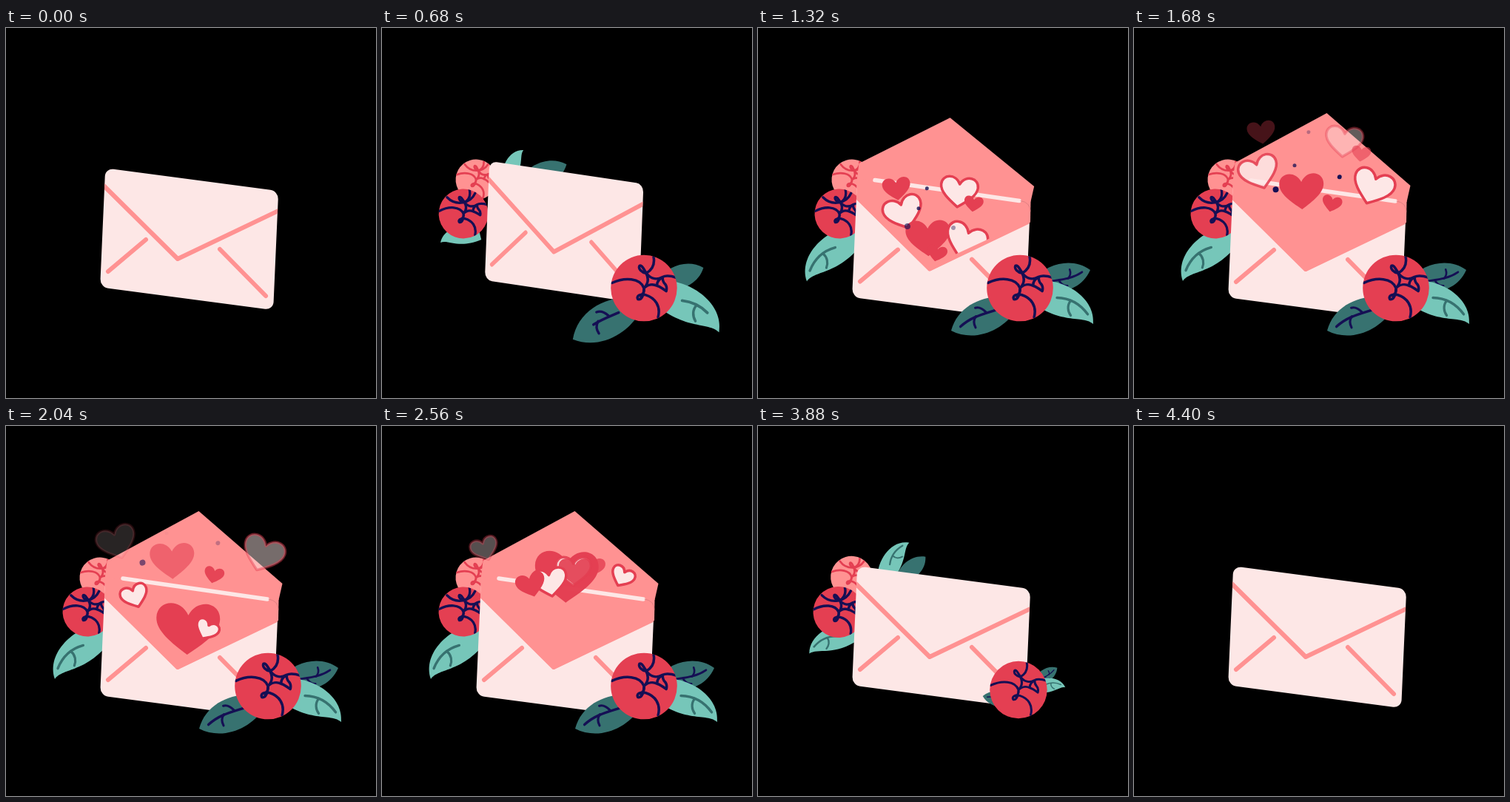
Recreate the animation shown at these times as an HTML page with a canvas. Size 500x500 px, loop 5.08 s.

```html
<!DOCTYPE html>
<html lang="en">
<head>
<meta charset="utf-8">
<title>Love letter</title>
<style>
html, body { margin: 0; width: 100%; height: 100%; overflow: hidden; background: #000; }
canvas { display: block; width: 500px; height: 500px; }
</style>
</head>
<body>
<canvas id="stage" width="500" height="500"></canvas>
<script>
const LOOP = 5080, STEP = 40;
const PALE = '#fde7e6', PINK = '#ff9292', RED = '#e43f52', NAVY = '#150f54',
  TEAL = '#76c6b9', PINE = '#377270';
const ctx = document.getElementById('stage').getContext('2d');
ctx.lineCap = ctx.lineJoin = 'round';

const clamp = x => Math.max(0, Math.min(1, x));

// Grows with an overshoot after begin and shrinks the same way before end
function pop(t, begin, end) {
  const x = clamp(Math.min(t - begin, end - t) / 800) - 1;
  return Math.max(0, 1 + 2.7 * x ** 3 + 1.7 * x ** 2);
}

// Opens with a cubic ease-out and closes as its mirror
const openness = t => 1 - (1 - clamp(Math.min(t - 1060, 3460 - t) / 380)) ** 3;

function layer(draw) {
  ctx.save();
  draw();
  ctx.restore();
}

function fill(path, color) {
  ctx.fillStyle = color;
  ctx.fill(path);
}

function stroke(path, color, width) {
  ctx.strokeStyle = color;
  ctx.lineWidth = width;
  ctx.stroke(path);
}

const poly = pts => new Path2D('M' + pts.join('L') + 'Z');

function circle(r) {
  const path = new Path2D();
  path.arc(0, 0, r, 0, 7);
  return path;
}

// ---- Leaves: unit shapes running from base (0,0) to tip (1,0)
const CURVED = {
  shape: new Path2D('M0 -.12C.25 -.33 .82 -.37 1 0C.8 -.04 .6 .27 0 .17Z'),
  vein: new Path2D('M.36 -.06C.52 -.15 .7 -.15 .86 -.08'),
  twig: new Path2D('M.55 -.12C.54 -.04 .59 .03 .66 .06')
};
const STRAIGHT = {
  shape: new Path2D('M0 -.1C.3 -.3 .75 -.3 1 0C.75 .32 .3 .3 0 .1Z'),
  vein: new Path2D('M.28 .02C.48 .04 .66 .07 .85 0'),
  twig: new Path2D('M.42 .05Q.46 .16 .54 .17M.58 .05Q.66 0 .65 -.1')
};

// The leaf turns by swing degrees while it unfolds from base to tip
function drawLeaf(t, kind, color, vein, flip, [bx, by], [tx, ty], swing, begin, end) {
  const p = pop(t, begin, end);
  if (!p) return;
  const size = Math.hypot(tx - bx, ty - by) * p;
  const grown = clamp((t - begin - 180) / 350);
  layer(() => {
    ctx.translate(bx, by);
    ctx.rotate(Math.atan2(ty - by, tx - bx) + swing * (1 - p) * Math.PI / 180);
    ctx.scale(size, size * flip);
    fill(kind.shape, color);
    if (!vein || !grown) return;
    ctx.setLineDash([grown * .6, 9]);
    stroke(kind.vein, vein, .037);
    if (grown > .6) stroke(kind.twig, vein, .034);
  });
}

function drawBackLeaves(t) {
  drawLeaf(t, STRAIGHT, PINE, null, 1, [190, 208], [249, 184], -75, 380, 4056);
  drawLeaf(t, CURVED, TEAL, PINE, 1, [168, 207], [228, 152], -45, 555, 4056);
  drawLeaf(t, CURVED, TEAL, PINE, -1, [132, 277], [66, 342], 75, 555, 4056);
}

function drawFrontLeaves(t) {
  drawLeaf(t, STRAIGHT, PINE, NAVY, 1, [375, 346], [449, 327], -35, 475, 3972);
  drawLeaf(t, CURVED, TEAL, PINE, 1, [372, 352], [453, 400], -54, 280, 3972);
  drawLeaf(t, STRAIGHT, PINE, NAVY, 1, [345, 373], [261, 409], 63, 280, 3972);
}

// ---- Roses: petal lines for a rose of radius 44.5 around (0,0)
const petals = new Path2D(
  'M13 -42C15 -31 10 -24 3 -20C-3 -21 -8 -26 -6 -30C-3 -32 0 -25 4 -19' +
  'M-43 -7C-26 -15 -5 -14 0 0C1 5 -1 8 -5 10' +
  'M3 -20C7 -12 5 -5 0 0C5 -5 12 -6 18 -3' +
  'M4 -19C10 -12 18 -11 25 -15C31 -18 38 -16 44 -14' +
  'M25 -15C19 -11 17 -7 18 -3C22 -2 26 1 30 4C31 0 30 -4 28 -6C26 -8 25 -11 25 -15' +
  'M0 0C0 9 -3 16 -8 15C-11 11 -5 7 2 9C15 13 23 24 19 39');
const crown = new Path2D('M-28 -31C-13 -14 13 -17 23 -36');
const disc = circle(44.5);

function drawRose(x, y, r, turn, color, line, [ax, ay], s) {
  if (!s) return;
  const small = r < 40;
  layer(() => {
    ctx.translate(ax + (x - ax) * s, ay + (y - ay) * s);
    ctx.rotate(turn);
    ctx.scale(r * s / 44.5, r * s / 44.5);
    fill(disc, color);
    ctx.clip(disc);
    stroke(petals, line, small ? 4.4 : 3.5);
    if (small) stroke(crown, line, 4.4);
  });
}

// ---- Envelope
const body = new Path2D();
const flat = new Path2D();
flat.roundRect(0, 0, 234, 161, 11);
body.addPath(flat, new DOMMatrix([1, .132, -.044, 1, 134.2, 189.3]));
const pocket = new Path2D('M132 213L232 312L370 246');
const inside = poly([[134, 188], [368.5, 220], [368, 249], [232, 315], [133, 218]]);
const seams = new Path2D('M138 329L189 286M289 299L351 362');
const hinge = new Path2D('M158 192L353 220');
const fold = new Path2D('M355 220Q368 222 368 234');

function drawEnvelope(t) {
  const bump = Math.sin(clamp((t - 560) / 240) * Math.PI) ** 2;
  const sx = 1 - .11 * bump, open = openness(t);
  layer(() => {
    ctx.translate(234 * (1 - sx), 14 * open - 9.5 * bump);
    ctx.scale(sx, 1);
    fill(body, PALE);
    stroke(seams, PINK, 6);
    layer(() => {
      ctx.clip(body);
      stroke(pocket, PINK, 6);
    });
    if (open) drawFlap(1 - 2 * open);
  });
}

// k runs from 1 (folded down) to -1 (standing up)
function drawFlap(k) {
  const left = [134.5 - 2 * k, 189 + 21 * k], right = [368.5 - 5 * k, 220 + 21 * k];
  const apex = [246 - 14.5 * k, 206.5 + 105.5 * k];
  fill(inside, PINK);
  fill(poly([[134, 190], left, apex, right, [368.5, 221]]), k > 0 ? PALE : PINK);
  if (k > 0) {
    stroke(new Path2D('M' + [left, apex, right].join('L')), PINK, 6);
  } else {
    stroke(hinge, PALE, 5.5);
    stroke(fold, '#d87c7e', .8);
  }
}

// ---- Hearts and dots fanning out of the pocket, slowing as they rise
const heart = new Path2D('M0 .42C-.25 .24 -.5 .06 -.5 -.15C-.5 -.42 -.14 -.48 0 -.2' +
  'C.14 -.48 .5 -.42 .5 -.15C.5 .06 .25 .24 0 .42Z');
const dot = circle(.5);
const mouth = poly([[0, 0], [500, 0], [500, 200], [368, 259], [232, 322], [133, 224], [0, 92]]);

// kind, birth, x at the bottom, sideways drift per rise, speed, size
const floats = [
  ['red', 1120, 210, -.2, 8, 38],
  ['pale', 1100, 252, .18, 7.35, 50],
  ['red', 1140, 270, .23, 6.9, 26],
  ['pale', 1118, 238, -.51, 5.7, 53],
  ['red', 1240, 232, -.05, 5.25, 60],
  ['red', 1290, 232, .38, 4.7, 27],
  ['pale', 1264, 256, .58, 5.65, 56],
  ['dot', 1120, 217, .1, 8, 5],
  ['dot', 1120, 217, 0, 6.1, 5],
  ['dot', 1160, 215, -.21, 4.9, 8],
  ['dot', 1220, 252, .2, 6, 6],
  ['pale', 1730, 229, -.55, 5.7, 37],
  ['red', 1910, 243, .05, 5, 86],
  ['pale', 1920, 230, .75, 5, 32]
];
let seed = 7;
const random = () => (seed = seed * 16807 % 2147483647) / 2147483647;
for (let i = 0; i < 5; i++) {
  floats.push([i % 2 ? 'pale' : 'red', 2060 + 50 * i, 225 + 40 * random(),
    random() - .5, 6 + random(), 28 + 26 * random()]);
}

function drawFloat([kind, birth, x, drift, speed, size], t) {
  const age = t - birth, left = 5700 / speed - age;
  if (age <= 0 || left <= 0) return;
  const rise = speed * Math.sqrt(age);
  layer(() => {
    ctx.globalAlpha = clamp(left / 500) * (kind === 'dot' ? clamp(age / 250) : 1);
    ctx.translate(x + drift * rise, 330 - rise);
    ctx.rotate(drift * 36 * Math.PI / 180);
    ctx.scale(size, size);
    if (kind === 'dot') return fill(dot, NAVY);
    fill(heart, kind === 'red' ? RED : PALE);
    if (kind === 'pale') stroke(heart, RED, 3.5 / size);
  });
}

function render(t) {
  ctx.fillStyle = '#000';
  ctx.fillRect(0, 0, 500, 500);
  const left = pop(t, 385, 4200), right = pop(t, 385, 4100);
  drawBackLeaves(t);
  drawRose(127, 205, 27.5, .1, PINK, RED, [145, 235], left);
  drawRose(110, 251, 33.5, -.05, RED, NAVY, [145, 235], left);
  drawEnvelope(t);
  layer(() => {
    ctx.clip(mouth);
    floats.forEach(f => drawFloat(f, t));
  });
  drawFrontLeaves(t);
  drawRose(354, 351.5, 44.8, 0, RED, NAVY, [339, 389], right);
}

const start = performance.now();
function tick() {
  const t = (performance.now() - start) % LOOP;
  render(Math.floor(t / STEP) * STEP);
  requestAnimationFrame(tick);
}
tick();
</script>
</body>
</html>
```
